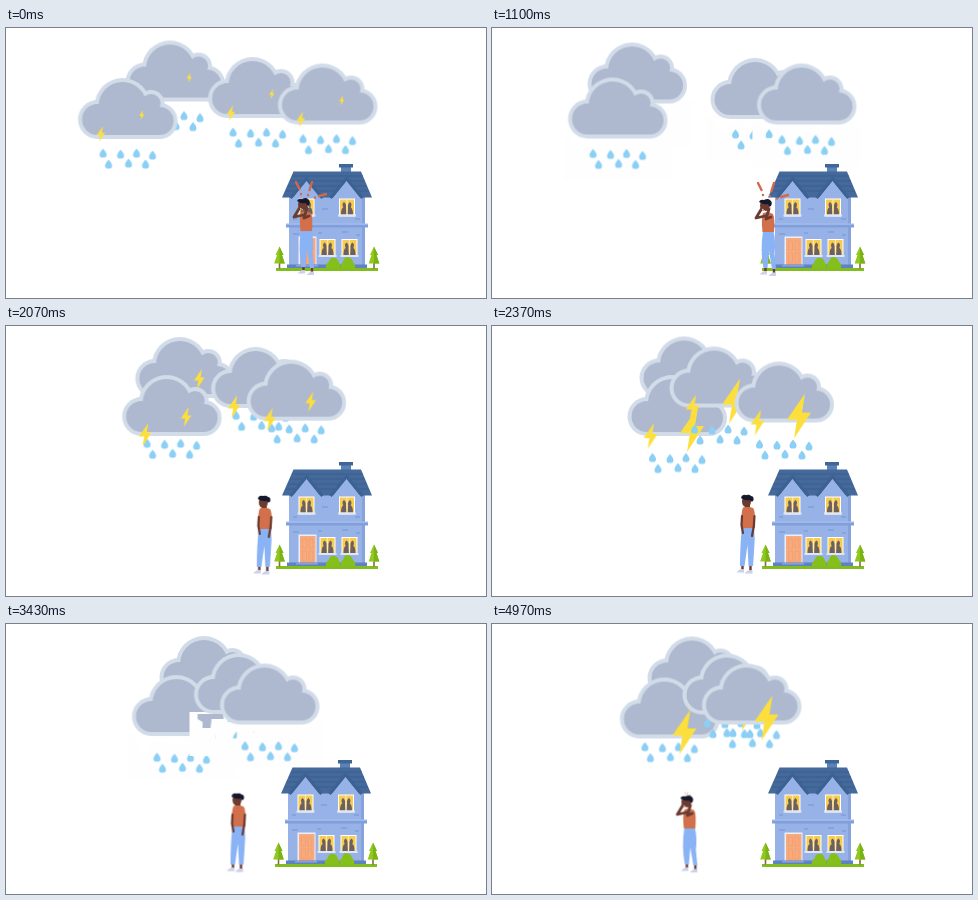
Animation of 480 by 270 pixels, one loop 5.01 s. Source, as an HTML page:

```html
<!DOCTYPE html>
<html lang="en">
<head>
<meta charset="utf-8">
<title>Storm over the house</title>
<style>
html, body { margin: 0; width: 100%; height: 100%; overflow: hidden; background: #fff; }
svg { display: block; width: 100vw; height: 100vh; }

.cloud, .rain, .big, .small, .box, .person, .marks { animation: 5010ms linear infinite; }
.step { animation: 5010ms step-end infinite; }

.back  { animation-name: back; }
.left  { animation-name: left; }
.mid   { animation-name: mid; }
.right { animation-name: right; }
@keyframes back {
  0% { transform: translate(119px, 12.5px); }
  21.96% { transform: translate(95px, 14.5px); }
  34.53% { transform: translate(108px, 11.5px); }
  47.31% { transform: translate(147px, 10.5px); }
  53% { transform: translate(149px, 9px); }
  68.46% { transform: translate(153px, 12px); }
  83.83% { transform: translate(154px, 12px); }
  100% { transform: translate(155px, 12.5px); }
}
@keyframes left {
  0% { transform: translate(71.5px, 50px); }
  21.96% { transform: translate(75.5px, 49.5px); }
  34.53% { transform: translate(93.5px, 49px); }
  47.31% { transform: translate(135px, 49px); }
  55% { transform: translate(125px, 49.5px); }
  68.46% { transform: translate(125.5px, 51px); }
  83.83% { transform: translate(125px, 53px); }
  100% { transform: translate(127.5px, 53.500px); }
}
@keyframes mid {
  0% { transform: translate(201.5px, 29px); }
  21.96% { transform: translate(218px, 30px); }
  34.53% { transform: translate(236px, 21.5px); }
  47.31% { transform: translate(177px, 20.5px); }
  68.46% { transform: translate(187.5px, 29px); }
  83.83% { transform: translate(189px, 29px); }
  100% { transform: translate(190px, 29.5px); }
}
@keyframes right {
  0% { transform: translate(271.5px, 35.5px); }
  21.96% { transform: translate(264.5px, 35.5px); }
  34.53% { transform: translate(238px, 31.5px); }
  47.31% { transform: translate(242px, 35.5px); }
  68.46% { transform: translate(213.5px, 39.5px); }
  83.83%, 100% { transform: translate(209.5px, 39.5px); }
}

.rain { animation-name: rain; }
@keyframes rain {
  0% { transform: translateY(12px); }
  4.8%, 15%, 26%, 37.9%, 48.4%, 58.9%, 69.7%, 83.4%, 95.5% { transform: translateY(22px); }
  4.81%, 15.01%, 26.01%, 37.91%, 48.41%, 58.91%, 69.71%, 83.41%, 95.51% { transform: translateY(-3px); }
  100% { transform: translateY(8px); }
}

.big { animation-name: big; }
@keyframes big {
  0%, 39.92%, 79.84% { transform: scale(.22); opacity: 1; }
  5%, 44.9%, 84.8%, 20.1%, 60%, 100% { transform: none; opacity: 1; }
  20.15%, 39.9%, 60.05%, 79.82% { transform: none; opacity: 0; }
}
.small { animation-name: small; }
@keyframes small {
  0%, 39.92%, 79.84% { transform: scale(.35); opacity: 1; }
  2%, 41.9%, 81.8%, 6%, 45.9%, 85.8%, 14%, 53.9%, 93.8% { transform: scale(.58); opacity: 1; }
  4%, 43.9%, 83.8% { transform: scale(.58); opacity: .45; }
  16%, 39.9%, 55.9%, 79.82%, 95.8%, 100% { transform: scale(.58); opacity: 0; }
}
.box { animation-name: box; }
@keyframes box {
  0%, 20.1%, 39.92%, 60%, 79.84%, 100% { opacity: 0; }
  20.15%, 39.9%, 60.05%, 79.82% { opacity: 1; }
}

.person { animation-name: walk; }
@keyframes walk {
  0% { transform: translate(297px, 170px); }
  21.96% { transform: translate(273px, 171px); }
  34.53% { transform: translate(261px, 171px); }
  47.31% { transform: translate(255px, 169px); }
  68.46% { transform: translate(231.5px, 169.5px); }
  83.83% { transform: translate(210.500px, 170px); }
  100% { transform: translate(193.5px, 171.5px); }
}
.calm { animation-name: calm; }
.scared { animation-name: scared; }
.raise { animation-name: raise; }
.hide { animation-name: hide; }
.house { animation-name: nudge; }
@keyframes calm { 0%, 80%, 100% { opacity: 0; } 40% { opacity: 1; } }
@keyframes scared { 0%, 80%, 100% { opacity: 1; } 40% { opacity: 0; } }
@keyframes raise { 0%, 90%, 100% { opacity: 0; } 80% { opacity: 1; } }
@keyframes hide { 0%, 90%, 100% { opacity: 1; } 80% { opacity: 0; } }
@keyframes nudge { 0%, 97%, 100% { transform: none; } 62% { transform: translateX(-1px); } }
.marks { animation-name: marks; }
@keyframes marks {
  0%, 38% { transform: none; }
  40%, 97% { transform: scale(0); }
  100% { transform: scale(.25); }
}
</style>
</head>
<body>
<svg viewBox="0 0 480 270">
  <defs>
    <path id="drop" fill="#8bcff5" d="M0-4.500C2-2 3.500-.2 3.500 1.400A3.500 3.200 0 0 1-3.500 1.400C-3.500-.2-2-2 0-4.500Z"/>
    <path id="bolt" fill="#fddf3c" d="M7 0L-11 26H-1L-4 45L13 19H4Z"/>
    <g id="window">
      <path fill="#fff" d="M-8-9H8V9H-8Z"/>
      <path fill="#f8cc4c" d="M-7-8H7V7H-7Z"/>
      <path fill="#6d6062" d="M-6 7Q-6 1-3.800 0Q-5.500-4-3-5.500Q-.5-4-1 0L-.6 7ZM6 7Q6 1 3.800 0Q5.500-4 3-5.500Q.5-4 1 0L.6 7Z"/>
      <path fill="#fff" d="M-.6-8H.6V7H-.6Z" opacity=".6"/>
      <path fill="#dfe7f6" d="M-9 7H9V9H-9Z"/>
    </g>
    <g id="tree">
      <path fill="#8a6a3c" d="M-.8 16H.8V22H-.8Z"/>
      <path fill="#90c81e" d="M0 0L4 8.500H2.500L5.300 17H-5.300L-2.500 8.500H-4Z"/>
      <path fill="#7bb317" d="M0 0L4 8.500H2.500L5.300 17H0Z"/>
    </g>
    <g id="gable">
      <path fill="#97b2e6" d="M0 152.500L14.500 171H-14.500Z"/>
      <path fill="none" stroke="#3c6293" stroke-width="3" d="M-16 170L0 150.500L16 170"/>
    </g>
  </defs>

  <g id="sky"></g>

  <g class="house step">
    <path fill="#5c82b8" d="M335 138H345V146H335Z"/>
    <path fill="#3f6695" d="M333 136H347V139.500H333Z"/>
    <path fill="#97b2e6" d="M283 165H359V238H283Z"/>
    <path fill="#86a3de" d="M356 168H359V238H356Z"/>
    <path fill="#44699a" d="M287.500 143.500H355L366 169.500H276Z"/>
    <path fill="none" stroke="#375b8b" stroke-width=".8" d="M286 148H357M284 153H359M282 158H361M280 163H363"/>
    <use href="#gable" x="300.500"/>
    <use href="#gable" x="340.500"/>
    <path fill="#809fdb" d="M280 196H362V199.500H280Z"/>
    <path fill="#a9c0ee" d="M280 195.500H362V196.800H280Z"/>
    <path fill="none" stroke="#809edb" stroke-width="1.5" d="M287 206H293M336 204H342M349 191H354M287 191H291M316 181H322M312 205H316M350 207H354"/>
    <use href="#window" x="300.500" y="179.500"/>
    <use href="#window" x="341" y="179.500"/>
    <use href="#window" x="321.500" y="220"/>
    <use href="#window" x="343.500" y="220"/>
    <path fill="#e8eefb" d="M292.500 208.500H310.500V238H292.500Z"/>
    <path fill="#f8aa7d" d="M294 210H309.500V238H294Z"/>
    <path fill="none" stroke="#ec9a6e" stroke-width=".6" d="M296.500 213H300.500V222H296.500ZM303 213H307V222H303ZM296.500 225H300.500V235H296.500ZM303 225H307V235H303Z"/>
    <path fill="#5f82c2" d="M281 236.500H361V240H281Z"/>
    <path fill="#86a3de" d="M290 237H312V238.500H290Z"/>
    <path fill="#85bf1b" d="M320 240Q319 236 322.500 234.500Q324 229 328 230Q332 230 333 235Q335 236 334.500 240ZM335 240Q334.500 235 337 234Q338 228.500 342 229Q346 230 347 234Q350 236 349 240Z"/>
    <path fill="#82bd1e" d="M270 240H372V243H270Z"/>
    <use href="#tree" x="273.500" y="218.500"/>
    <use href="#tree" x="368" y="218.500"/>
  </g>

  <g class="person">
    <g class="calm step">
      <path fill="none" stroke="#6b3a31" stroke-width="2.4" d="M-4.500 68V75M3.500 68V75"/>
      <path fill="#ccd0ea" d="M-6 74H-3V77.500H-10.500Q-9.500 75-6 74ZM2 75H5.500V78.500H-2.500Q-1 76 2 75Z"/>
      <path fill="#89b3f5" d="M-5 32H7Q8.500 44 7 57L6 71H1.500L.5 50L-2.500 71H-7Q-7 50-5 32Z"/>
      <path fill="#6b3a31" d="M-2 8H3V14H-2Z"/>
      <path fill="#d1704a" d="M-4 12.500Q1 11 6 13Q8.500 15 8 33H-5Q-6.500 17-4 12.500Z"/>
      <path fill="none" stroke="#6b3a31" stroke-width="2.200" stroke-linecap="round" d="M-5 21L-5.500 30L-4 38M7.500 21L6.800 31L5 41"/>
      <ellipse cx="-.5" cy="6.500" rx="4.500" ry="5.500" fill="#6b3a31"/>
      <path fill="#15182a" d="M-6 3Q-5-1-1 0Q3-1 4 1Q7 1 6.500 5Q5 8 3 5Q-2 6-6 3Z"/>
    </g>
    <g class="scared step">
      <path fill="none" stroke="#6b3a31" stroke-width="2.400" d="M.5 67V73M9 67V74"/>
      <path fill="#ccd0ea" d="M-1 72H2V75.500H-5.500Q-4 73.500-1 72ZM8 73.500H11V77H3.500Q5 75 8 73.500Z"/>
      <path fill="#89b3f5" d="M-2 32H8.500Q11 43 9.500 54L11 70H7L4 52L2.500 69H-1.500Q-5 52-2 32Z"/>
      <path fill="#d1704a" d="M-2 14Q3 12 8 15Q10 19 9 33H-2.500Q-4 20-2 14Z"/>
      <ellipse cx="0" cy="6.500" rx="5" ry="5.500" fill="#6b3a31"/>
      <path fill="#15182a" d="M-6 3Q-5 0-1 1Q3-1 5 1Q8 3 6 7Q4 8 3 5Q-2 6-6 3Z"/>
      <g class="hide step">
        <path fill="none" stroke="#6b3a31" stroke-width="2.800" stroke-linecap="round" stroke-linejoin="round" d="M0 17L-9 19L-3 9M6 18L1 20L4 10"/>
        <path fill="none" stroke="#e9c9c5" stroke-width="1" d="M-3 10L0 12M5 8L6 10"/>
      </g>
      <g class="raise step" fill="none" stroke="#6b3a31" stroke-width="2.400" stroke-linecap="round" stroke-linejoin="round">
        <path d="M-2 17L-9 20L-7 13L-5 8M6 18L1 20L4 11"/>
      </g>
    </g>
    <g class="marks" fill="none" stroke="#d2694a" stroke-width="2.400" stroke-linecap="round">
      <path d="M-7-16L-3.500-9M9-16L6.500-8M23-4L16-2"/>
      <path d="M-2-4V-3.900M5-3V-2.900M12-.5V-.4"/>
    </g>
  </g>
</svg>
<script>
const drops = [[25.5, 63], [43, 64], [59, 63], [75, 65], [31, 74], [51, 73], [68, 74]];

// Overlapping lobes; a positive inset gives the inner colour.
function lobes(inset, color) {
  const circles = [[20, 41.5, 19.5], [45, 28, 28], [73.5, 25.5, 13.5], [82, 43, 18]];
  return `<g fill="${color}">` +
    circles.map(([x, y, r]) => `<circle cx="${x}" cy="${y}" r="${r - inset}"/>`).join("") +
    `<rect x="20" y="28" width="62" height="${33 - inset}"/></g>`;
}

function cloud(name) {
  return `<g class="cloud ${name}">
    <path class="box" fill="#fefefe" fill-rule="evenodd"
      d="M-4 59H105V103H-4ZM4 61H30V66H18L17 75H9V69L4 66ZM34 61H66V69H34Z"/>
    <g class="rain">${drops.map(([x, y]) => `<use href="#drop" x="${x}" y="${y}"/>`).join("")}</g>
    ${lobes(0, "#d2dce9")}${lobes(4, "#aeb9cf")}
    <g transform="translate(23 48)"><use class="small" href="#bolt"/></g>
    <g transform="translate(64 32)"><use class="big" href="#bolt"/></g>
  </g>`;
}

document.getElementById("sky").innerHTML = ["back", "left", "mid", "right"].map(cloud).join("");
</script>
</body>
</html>
```
